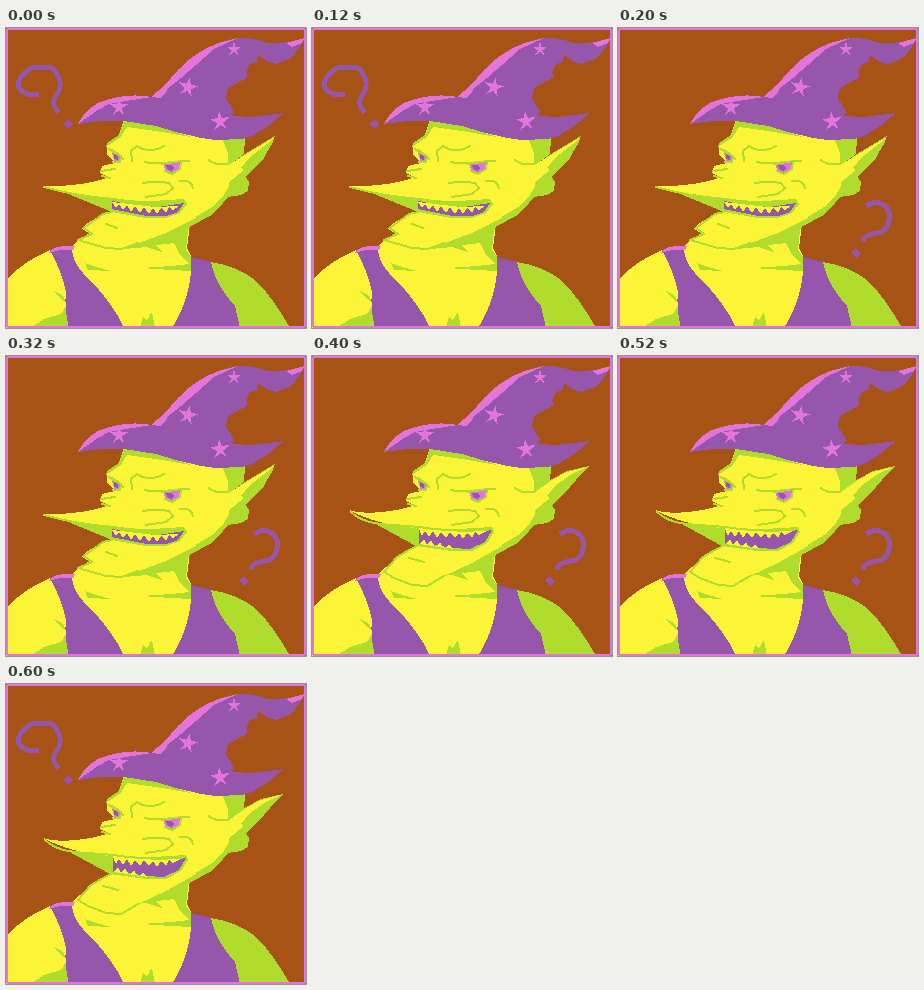
Write an HTML page without scripts that moves like this. It is 300 px wide and 300 px high and loops after 0.8 s.

```html
<!DOCTYPE html>
<html lang="en">
<head>
<meta charset="utf-8">
<title>Puzzled goblin wizard</title>
<style>
  html, body { margin: 0; width: 100%; height: 100%; overflow: hidden; background: #a85316; }
  svg { display: block; width: 100vw; height: 100vh; shape-rendering: crispEdges; }
  .y { fill: #fcf436; }
  .g { fill: #b0dc2e; }
  .p { fill: #9656ac; }
  .k { fill: #e274dc; }
  .line { fill: none; stroke: #b0dc2e; stroke-width: 2; stroke-linecap: round; stroke-linejoin: round; }
  .mark { fill: none; stroke: #9656ac; stroke-width: 5; stroke-linejoin: round; }
  .shut, .open, .left, .right { animation: 800ms step-end infinite; }
  .shut { animation-name: first-half; }
  .open { animation-name: second-half; }
  .left { animation-name: outer; }
  .right { animation-name: inner; }
  @keyframes first-half { 0% { visibility: visible } 50%, 100% { visibility: hidden } }
  @keyframes second-half { 0% { visibility: hidden } 50%, 100% { visibility: visible } }
  @keyframes outer { 0%, 75%, 100% { visibility: visible } 25% { visibility: hidden } }
  @keyframes inner { 0%, 75%, 100% { visibility: hidden } 25% { visibility: visible } }
</style>
</head>
<body>
<svg viewBox="0 0 300 300" preserveAspectRatio="none">
  <defs>
    <path id="star" class="k" d="M0-10 2-3 10-3 3 2 6 9 0 4-7 9-3 2-10-3-2-3Z"/>
  </defs>
  <rect width="300" height="300" fill="#a85316"/>

  <!-- body -->
  <path class="y" d="M0 252Q18 233 44 222L66 219 72 212 110 190 184 196 181 220 186 230 200 300H0Z"/>
  <path class="g" d="M204 234Q232 238 250 253 268 271 284 300H225ZM24 300 38 291 55 286 60 278 64 300ZM46 262 56 267 61 275 54 270Z"/>
  <path class="g" d="M118 221 150 209 187 195 182 202 180 222 186 230 185 243 165 242 136 240 165 238 183 236 173 225 168 215 150 217 156 224 140 219ZM79 235 90 239 105 243 82 242ZM134 300 137 289 141 292 146 284 149 300Z"/>
  <path class="p" d="M44 222 66 220Q66 236 84 252 108 277 118 300H63Q58 280 60 264 56 244 44 222ZM185 229 205 234Q209 256 229 278L234 300H166Q187 266 185 229Z"/>
  <path class="k" d="M43 225Q46 217 69 218L67 222Q53 221 47 224Z"/>

  <!-- ears -->
  <path class="g" d="M219 110 239 110 238 126 222 138 262 122 258 130 240 149 243 154 242 163 235 167 222 169 213 180 204 188 187 197 150 211 120 221 150 190Z"/>
  <g class="shut">
    <path class="g" d="M222 138 239 126 269 108 267 114 257 131 240 149Z"/>
    <path class="y" d="M219 139 239 127 269 109 261 116 244 129 235 140 238 142 222 155Z"/>
  </g>
  <g class="open">
    <path class="g" d="M222 138 240 123 255 115 277 110 270 117 258 131 240 149Z"/>
    <path class="y" d="M219 139 240 124 255 116 275 111 260 118 244 129 235 140 238 142 222 155Z"/>
  </g>

  <!-- head -->
  <path class="y" d="M118 92 113 107 101 115 101 126 109 135 96 138 94 145 104 150 106 174 178 196 206 179 217 169 223 158 222 125 216 110Z"/>
  <path class="g" d="M118 93 113 107 101 115 100 119 115 109 121 99 150 103 185 109 150 97Z"/>

  <g class="shut">
    <path class="y" d="M106 178 106 184 97 186 80 196 76 201 85 206 70 212 84 217 100 221 116 221 130 216 160 205 190 190 178 176Z"/>
    <path class="line" d="M106 184 97 186 78 200 86 206 72 212 100 220 116 221 132 215M100 196 111 200"/>
    <path class="g" d="M60 165 105 170 130 174 178 171 181 176 174 185 160 190 140 190 106 184Z"/>
    <path class="p" d="M106 173 126 177 152 179 178 175 172 184 160 188 140 188 125 185 106 181Z"/>
    <path class="y" d="M106 174l4 6 3-4 4 6 4-5 4 7 4-6 5 7 4-6 5 7 4-6 4 6 4-6 5 5 3-6 4 3 6-4-24 1Z"/>
    <path class="y" d="M36 158Q76 159 104 149L140 152Q165 150 167 160 160 168 139 170L104 171Q67 167 36 158Z"/>
    <path class="line" d="M38 159Q69 168 108 171 130 175 160 174"/>
  </g>

  <g class="open">
    <path class="y" d="M106 180 105 190 97 194 84 202 71 217 80 222 100 229 115 230 130 221 160 207 190 190 178 178Z"/>
    <path class="line" d="M105 190 97 194 85 201 72 216 82 222 100 229 115 230 132 220M97 202 112 206"/>
    <path class="g" d="M60 166 105 170 130 174 180 171 182 176 175 187 160 195 140 195 104 190Z"/>
    <path class="p" d="M107 172 126 176 152 178 180 174 173 186 158 193 140 192 118 188 107 188Z"/>
    <path class="y" d="M106 171l4 9 3-5 4 6 4-6 4 7 4-6 5 6 4-6 5 6 4-5 4 6 4-6 5 5 3-6 4 3 8-4-26 1ZM107 188l5-5 3 6 4-5 4 7 5-5 4 7 5-4 5 4Z"/>
    <path class="y" d="M37 154Q49 158 70 156 89 154 104 149L140 152Q165 150 167 160 160 168 139 170L104 172Q65 169 37 154Z"/>
    <path class="line" d="M39 156Q48 165 67 168L108 171Q130 175 160 174"/>
  </g>

  <!-- face details -->
  <path class="line" d="M103 121Q112 124 117 131M139 134Q149 137 165 134L183 133M126 133 125 123 131 118Q139 124 152 121L158 118M137 155Q150 153 163 155L167 160 160 166 140 169M174 153Q185 151 187 160M203 132Q210 138 222 136M95 143 109 141M104 150 96 148"/>
  <path class="k" d="M105 123 114 127 115 132 109 134ZM157 136 174 134 173 141 166 145 160 143Z"/>
  <path class="p" d="M108 126 112 128 112 132 108 131ZM160 137 165 137 168 140 165 143 161 141Z"/>
  <path class="line" d="M104 122 115 128 114 134 107 134M156 136 175 133 174 141 166 146 159 143"/>

  <!-- hat -->
  <path class="p" d="M72 96Q79 82 92 75 119 64 147 69 159 58 172 42 199 15 232 10 244 9 262 15 280 16 299 10L294 19 285 30 270 36 262 34 252 27 251 34 244 36 240 44 242 49 235 53 222 60 220 70 228 84 226 88 245 89 278 85 262 98 248 107 236 111 210 112 195 110 170 104 150 98 118 93 95 93Z"/>
  <path class="k" d="M72 96Q79 82 92 75 119 64 146 69L120 73 103 76 92 82ZM145 69 158 58 172 42Q187 25 212 15L232 10 208 21 190 37 175 50 161 61 160 65 154 70ZM280 15 299 10 296 15 286 19Z"/>
  <use href="#star" transform="translate(113 79) scale(.9)"/>
  <use href="#star" transform="translate(182 59) rotate(12)"/>
  <use href="#star" transform="translate(214 93) rotate(-6)"/>
  <use href="#star" transform="translate(228 21) scale(.75)"/>

  <!-- question marks -->
  <g class="left">
    <path class="mark" d="M33 66 25 67Q12 64 12 55 15 46 25 40L44 39Q51 42 54 54 55 62 49 69 45 77 53 85"/>
    <path class="p" d="M62 91 68 96 63 100 57 97Z"/>
  </g>
  <g class="right">
    <path class="mark" d="M248 178 257 174Q267 175 271 184 273 198 264 204L254 206Q245 208 245 214"/>
    <path class="p" d="M237 220 243 225 238 230 233 225Z"/>
  </g>

  <rect x="1" y="1" width="298" height="298" rx="2" fill="none" stroke="#e274dc" stroke-width="2"/>
</svg>
</body>
</html>
```
